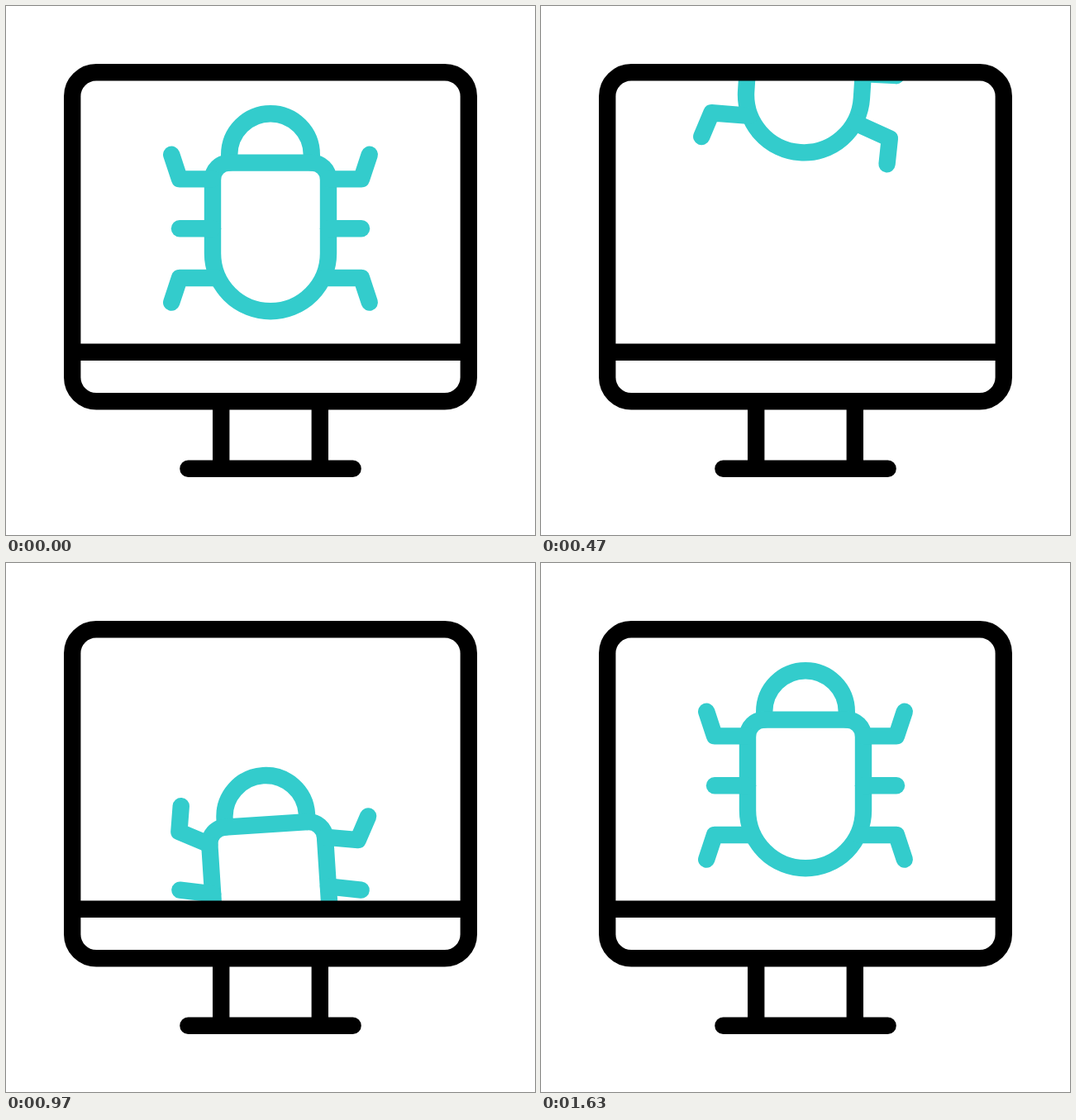
An HTML page for the animation above (1670 ms loop, 640 by 640 pixels).

```html
<!DOCTYPE html>
<html lang="en">
<head>
<meta charset="utf-8">
<title>Bug on a screen</title>
<style>
  html, body { margin: 0; width: 100%; height: 100%; overflow: hidden; background: #fff; }
  svg { display: block; width: 100%; height: 100%; }
  .bug, .monitor { fill: none; stroke-width: 20.4; stroke-linejoin: round; }
  .bug { stroke: #33cccc; stroke-linecap: round; }
  .monitor { stroke: #000; }
</style>
</head>
<body>
<svg viewBox="0 0 640 640">
  <defs>
    <clipPath id="screen"><rect x="80" y="80" width="480" height="338"/></clipPath>
  </defs>
  <g id="bugs" clip-path="url(#screen)"></g>
  <g class="monitor">
    <rect x="80.2" y="80.2" width="479.6" height="398" rx="29"/>
    <path d="M80 418.7H560M260.2 478V560M379.8 478V560"/>
    <path d="M220.4 559.8H419.6" stroke-linecap="round"/>
  </g>
</svg>
<script>
const NS = 'http://www.w3.org/2000/svg';
const LOOP = 1670, FPS = 30;
const PIVOT = { x: 320, y: 269.2 };
const RAD = Math.PI / 180;

// A swing that is at rest for t <= 0: growth per step, speed in degrees per step.
const swing = (amp, growth, speed) => t =>
  t <= 0 ? 0 : amp * Math.exp(growth * t) * Math.sin(speed * t * RAD);

// One bug crawls out at the top while the other climbs in from below.
// The arriving one counts its steps down to rest.
const leaving = {
  lift: f => -13.7 * f,
  clock: f => ({ body: f, left: f, right: f }),
  body: swing(-15.1, -0.035, 24),
  left: {
    front: swing(-6.6, 0, 25),
    mid: swing(-10.2, 0, 12.6),
    rear: swing(-8.5, 0.08, 25.6)
  },
  right: {
    front: swing(-1, 0, 25),
    mid: swing(-9.9, 0, 12.6),
    rear: swing(-16.6, 0.019, 18)
  }
};
const arriving = {
  lift: f => 12.66 * Math.max(0, 39 - f),
  clock: f => ({ body: 37 - f, left: 48 - f, right: 49 - f }),
  body: swing(2.75, 0.082, 28),
  left: {
    front: swing(9.3, 0.055, 5),
    mid: swing(1.4, 0.114, 22),
    rear: swing(18.8, 0, 22)
  },
  right: {
    front: swing(17.5, 0.018, 8),
    mid: swing(3.1, 0.065, 21),
    rear: swing(5, 0, 8)
  }
};

function add(parent, tag, attrs = {}) {
  const el = parent.appendChild(document.createElementNS(NS, tag));
  for (const k in attrs) el.setAttribute(k, attrs[k]);
  return el;
}

const place = (el, x, y, angle) =>
  el.setAttribute('transform', `translate(${x} ${y}) rotate(${angle})`);

function makeLegs(root) {
  const legs = [];
  for (const [side, s] of [['left', -1], ['right', 1]]) {
    for (const [row, dir] of [['front', -1], ['mid', 0], ['rear', 1]]) {
      const hip = row === 'rear' ? 64 : 70;
      const foot = dir ? `l${s * 9.8} ${dir * 29.6}` : '';
      const el = add(root, 'path', { d: `M0 0H${s * (110 - hip)}${foot}` });
      legs.push({ side, row, x: s * hip, y: dir * 59.8, el });
    }
  }
  return legs;
}

function makeBug(motion) {
  const root = add(document.getElementById('bugs'), 'g', { class: 'bug' });
  add(root, 'path', { d: 'M-49.8 -79.6V-89.2a49.8 49.8 0 0 1 99.6 0V-79.6' });
  add(root, 'path', {
    d: 'M-50 -79.6H50a20 20 0 0 1 20 20V30a70 70 0 0 1 -140 0V-59.6a20 20 0 0 1 20 -20z'
  });
  const legs = makeLegs(root);

  return f => {
    const t = motion.clock(f);
    place(root, PIVOT.x, PIVOT.y + motion.lift(f), motion.body(t.body));
    for (const { side, row, x, y, el } of legs) {
      place(el, x, y, motion[side][row](t[side]));
    }
  };
}

const bugs = [makeBug(leaving), makeBug(arriving)];

function render(ms) {
  const tick = Math.floor((ms % LOOP) / 10);
  const step = Math.floor((tick + 0.5) * FPS / 100);
  bugs.forEach(pose => pose(step));
}

const start = performance.now();
function loop() {
  render(performance.now() - start);
  requestAnimationFrame(loop);
}
loop();
</script>
</body>
</html>
```
